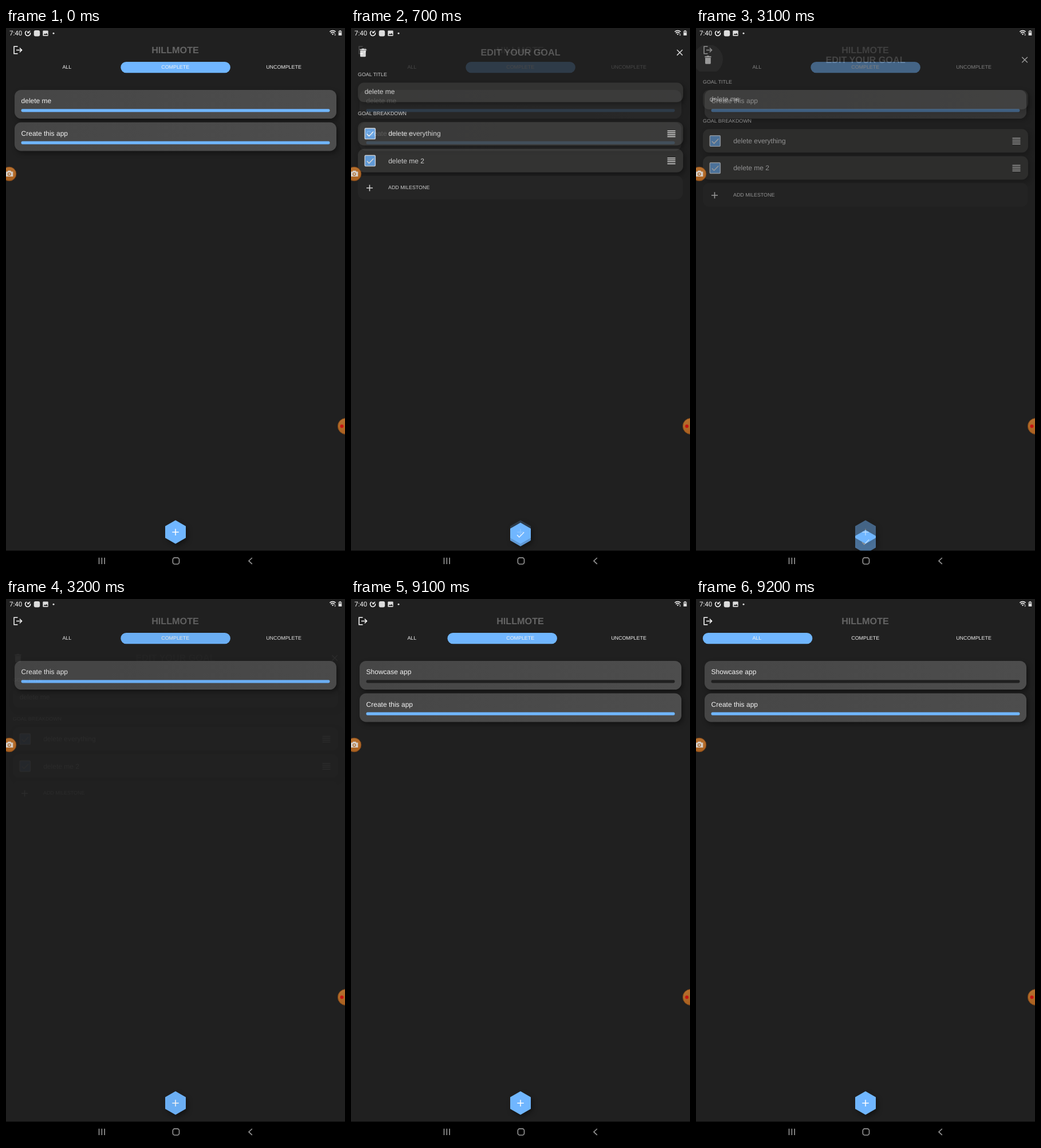
Write an HTML page that moves like this. It is 592 px wide and 947 px high and loops after 9.6 s.

```html
<!DOCTYPE html>
<html lang="en">
<head>
<meta charset="utf-8">
<title>Goal tracker</title>
<style>
  html, body { margin: 0; width: 100%; height: 100%; overflow: hidden; background: #202020; }
  svg { display: block; width: 100vw; height: 100vh; font: 12px "Liberation Sans", Arial, sans-serif; }
  text { fill: #f2f2f2; text-rendering: geometricPrecision; }
  .small { font-size: 8.9px; }
  .title { font-size: 16.2px; font-weight: bold; fill: #646464; }
  .mid { text-anchor: middle; }
  .line { fill: none; stroke: #fff; stroke-width: 1.5; }
  .shadow { filter: drop-shadow(3px 4px 4px #0006); }
  .row { fill: #383837; }
  .nav { fill: none; stroke: #929292; stroke-width: 1.7; }
</style>
</head>
<body>
<svg viewBox="0 0 592 947" preserveAspectRatio="none">
  <defs>
    <linearGradient id="cardFill"><stop stop-color="#464646"/><stop offset="1" stop-color="#4d4d4d"/></linearGradient>
    <linearGradient id="orange" x2="0" y2="1"><stop stop-color="#b8712f"/><stop offset="1" stop-color="#a9601f"/></linearGradient>
    <clipPath id="header"><path d="M0 13H60V59H0z"/></clipPath>
    <path id="hex" class="shadow" d="M296 859.5 313 869.3V888.7L296 898.5 279 888.7V869.3z"
      fill="#70b6ff" stroke="#70b6ff" stroke-width="2" stroke-linejoin="round"/>
    <g id="grip"><path class="line" d="M552.5 -4.8h14m-14 3.3h14m-14 3.3h14m-14 3.3h14" stroke-width="1.6"/></g>
    <g id="tick">
      <rect x="24.2" y="-9.3" width="18.2" height="18.6" rx="1.5" fill="#70b6ff" stroke="#eef6ff" stroke-width="1.4"/>
      <path class="line" d="M27.8 .5 31.5 4.3 39.3 -3.8"/>
    </g>
  </defs>
  <rect width="592" height="947" fill="#202020"/>

  <g id="home">
    <path class="line" d="M20.5 32.2H14V44.8H20.5M18 38.5H27.5M23.8 34.7 27.6 38.5 23.8 42.3" stroke-width="1.7"/>
    <text class="title mid" x="295.5" y="44">HILLMOTE</text>
    <rect id="pill" y="59" width="191.5" height="19.3" rx="9.6" fill="#70b6ff"/>
    <g class="small mid">
      <text x="106.3" y="71">ALL</text>
      <text x="295.7" y="71">COMPLETE</text>
      <text x="485" y="71">UNCOMPLETE</text>
    </g>
    <g id="cards"></g>
    <use href="#hex"/>
    <path class="line" d="M290.3 879.3h11.4M296 873.6v11.4"/>
  </g>

  <g id="edit">
    <rect y="-80" width="592" height="1027" fill="#202020"/>
    <circle id="ripple" cx="21" cy="37.5" r="26" fill="#fff" opacity=".08" clip-path="url(#header)"/>
    <path d="M15.3 32.3h3l1-1h3.2l1 1h3v1.8H15.3zM16 35h9.8v9.3q0 1.5-1.5 1.5h-6.8q-1.5 0-1.5-1.5z" fill="#fff"/>
    <text class="title mid" x="296" y="44">EDIT YOUR GOAL</text>
    <path class="line" d="M569.3 33.7l9.6 9.6m0-9.6l-9.6 9.6"/>
    <text class="small" x="12" y="79.6">GOAL TITLE</text>
    <rect class="row shadow" x="12" y="91" width="568" height="34" rx="11"/>
    <text x="23.7" y="111">delete me</text>
    <text class="small" x="12" y="148">GOAL BREAKDOWN</text>
    <g id="steps"></g>
    <rect x="12" y="253.5" width="567.5" height="41" rx="11" fill="#272727"/>
    <path class="line" d="M27 274.6h11M32.5 269.1v11"/>
    <text class="small" x="65" y="276.7">ADD MILESTONE</text>
    <use href="#hex"/>
    <path class="line" d="M290 879.8 293.8 883.6 302.2 875.2"/>
  </g>

  <!-- system bars -->
  <rect width="592" height="19" fill="#202020"/>
  <text x="6" y="13.3" style="font:11.6px Roboto,sans-serif">7:40</text>
  <g fill="#ddd">
    <path class="line" d="M36 5.2A4.4 4.4 0 1 0 42.4 8.2M38.2 9.3V5.8M38.2 9.3 42 5" stroke-width="1.2"/>
    <rect x="48.7" y="4" width="10.5" height="10.5" rx="3"/>
    <rect x="64.3" y="4.5" width="9.4" height="9.4" rx="1.2"/>
    <path d="M65.6 12.2l2-2.7 1.4 1.6 1.9-2.4 2.2 3.5z" fill="#202020"/>
    <circle cx="83" cy="9.2" r="1.5"/>
    <path d="M565.3 6.5Q570.5 2.4 575.7 6.5" class="line" stroke-width="1.2"/>
    <path d="M567.2 8.8Q570.5 6.2 573.8 8.8" class="line" stroke-width="1.2"/>
    <path d="M568.8 10.3Q570.5 9 572.2 10.3L570.5 12.4zM573.5 11.2l1.2-1.7 1.2 1.7zm0 .7h2.4l-1.2 1.7z"/>
    <path d="M582 4.3h3v1h1.3V13H580.6V5.3H582z"/>
    <path d="M581.3 6h4.3v2h-4.3z" fill="#777"/>
  </g>
  <rect y="911.5" width="592" height="35.5" fill="#000"/>
  <path class="nav" d="M162.5 923.7v11.4m4.8-11.4v11.4m4.8-11.4v11.4M429.8 924 424 929.4 429.8 934.8"/>
  <rect class="nav" x="291.3" y="923.8" width="11.2" height="11.2" rx="3.4"/>

  <!-- floating buttons -->
  <g stroke="#6b3c17">
    <circle cx="5.6" cy="254.5" r="12.3" fill="url(#orange)"/>
    <circle cx="593.3" cy="694.5" r="14" fill="url(#orange)"/>
  </g>
  <path d="M-.5 250.5h2.8l1.3-1.8h4.6l1.3 1.8h2.8v8.6H-.5z" fill="#d5cdc6"/>
  <circle cx="5.7" cy="254.8" r="2.3" fill="none" stroke="#a9601f" stroke-width="1.1"/>
  <circle cx="586.5" cy="694.6" r="3" fill="#c41414"/>
</svg>
<script>
const $ = id => document.getElementById(id);
const clamp = v => Math.max(0, Math.min(1, v));

const card = ([label, done], i) => `<g transform="translate(0 ${i * 56.4})">
  <rect class="shadow" x="15" y="108" width="562" height="50" rx="11.5" fill="url(#cardFill)"/>
  <text x="26.6" y="131.3">${label}</text>
  <rect x="26.5" y="141.2" width="539" height="5.2" rx="2.4" fill="${done ? '#70b6ff' : '#202020'}"/></g>`;

$('steps').innerHTML = ['delete everything', 'delete me 2'].map((label, i) =>
  `<g transform="translate(0 ${180 + i * 47.2})">
  <rect class="row shadow" x="12" y="-20.7" width="568" height="41" rx="11"/>
  <use href="#tick"/><text x="65.2" y="4">${label}</text><use href="#grip"/></g>`).join('');

const created = ['Create this app', true];
const lists = [[['delete me', true], created], [created], [['Showcase app', false], created]]
  .map(list => list.map(card).join(''));
let shown;

// How far the edit screen is open: fast ease-out in, linear out.
function openness(t) {
  if (t < 600) return 0;
  if (t < 800) return 1 - (1 - (t - 550) / 350) ** 5;
  if (t < 3100) return 1;
  return clamp(.76 - (t - 3100) / 150);
}

const fade = p => p < .5 ? p / 2 : p < .9 ? .25 + (p - .5) * 1.125 : .7 + (p - .9) * 3;

const easeInOut = s => s < .5 ? 2 * s * s : 1 - 2 * (1 - s) ** 2;

function draw(now) {
  const t = Math.floor(now % 9600 / 100) * 100;
  const list = t < 3100 ? 0 : t < 9100 ? 1 : 2;
  if (list !== shown) $('cards').innerHTML = lists[shown = list];

  const p = openness(t);
  $('edit').setAttribute('opacity', fade(p));
  $('edit').setAttribute('transform', `translate(0 ${71 * (1 - p)})`);
  $('ripple').style.display = t < 3100 ? 'none' : '';

  const slide = t < 9100 ? 0 : easeInOut(clamp((t - 9059) / 141));
  $('pill').setAttribute('x', 200.3 - 188.5 * slide);
}

const start = performance.now();
function tick() {
  draw(performance.now() - start);
  requestAnimationFrame(tick);
}
tick();
</script>
</body>
</html>
```
